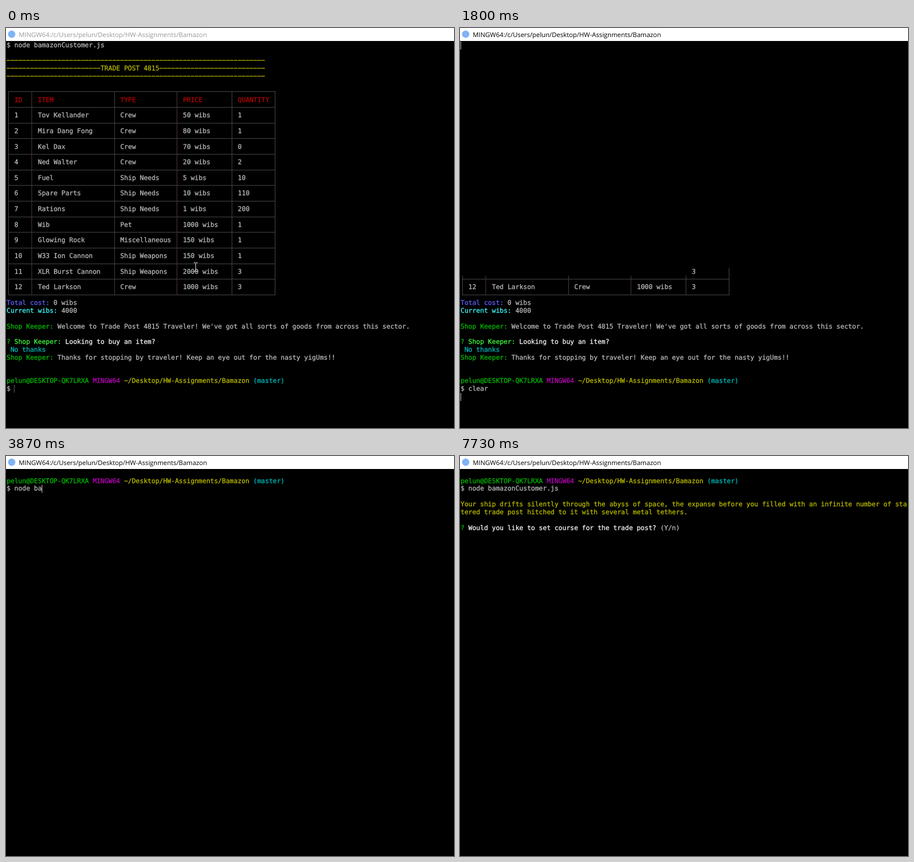
These frames come from a looping animation (790 by 708 pixels, 8000 ms). An HTML page:

```html
<!DOCTYPE html>
<html lang="en">
<head>
<meta charset="utf-8">
<title>Terminal</title>
<style>
  html, body { margin: 0; width: 100%; height: 100%; overflow: hidden; background: #000; }
  svg { display: block; }
  text {
    white-space: pre;
    text-rendering: geometricPrecision;
    font: 11.482px "DejaVu Sans Mono", monospace;
    stroke-width: 0.25px;
  }
  #title { font: 11.4px "Open Sans", "Noto Sans", sans-serif; }
</style>
</head>
<body>
<svg id="stage" width="790" height="708" viewBox="0 0 790 708"></svg>
<script>
const LOOP = 8000;
const CELL_W = 6.9125, CELL_H = 13.825, LEFT = 1, TOP = 23.5;
const C = {
  text: '#bfbfbf', white: '#fff', red: '#bf0000', green: '#00bf00', lime: '#40ff40',
  yellow: '#bfbf00', blue: '#6060ff', magenta: '#bf00bf', cyan: '#00bfbf', aqua: '#40ffff'
};
const colX = col => LEFT + col * CELL_W;
const rowY = row => TOP + row * CELL_H;

function add(parent, tag, attrs = {}, content = '') {
  const node = document.createElementNS('http://www.w3.org/2000/svg', tag);
  for (const key in attrs) node.setAttribute(key, attrs[key]);
  node.textContent = content;
  parent.append(node);
  return node;
}

const rect = (parent, x, y, width, height, fill) => add(parent, 'rect', { x, y, width, height, fill });

// parts alternate: text, colour name
function write(parent, row, col, ...parts) {
  const node = add(parent, 'text', { x: colX(col), y: Math.round(rowY(row) + 10.3) });
  for (let i = 0; i < parts.length; i += 2) {
    const color = C[parts[i + 1]];
    add(node, 'tspan', { fill: color, stroke: color }, parts[i]);
  }
  return node;
}

const stage = document.getElementById('stage');
rect(stage, 0, 0, 790, 708, '#000');
rect(stage, 0, 0, 790, 23, '#fff');
add(stage, 'circle', { cx: 10, cy: 11, r: 6.5, fill: '#80b3f5' });
const title = add(stage, 'text', { id: 'title', x: 22.5, y: 16 },
  'MINGW64:/c/Users/pelun/Desktop/HW-Assignments/Bamazon');

const shop = add(stage, 'g');
const shell = add(stage, 'g');
const story = add(stage, 'g');

function writePrompt(parent, row) {
  write(parent, row, 0, 'pelun@DESKTOP-QK7LRXA ', 'green', 'MINGW64 ', 'magenta',
    '~/Desktop/HW-Assignments/Bamazon ', 'yellow', '(master)', 'cyan');
  return write(parent, row + 1, 0, '$ ', 'text', '', 'text').lastChild;
}

const items = `ID|ITEM|TYPE|PRICE|QUANTITY
1|Tov Kellander|Crew|50 wibs|1
2|Mira Dang Fong|Crew|80 wibs|1
3|Kel Dax|Crew|70 wibs|0
4|Ned Walter|Crew|20 wibs|2
5|Fuel|Ship Needs|5 wibs|10
6|Spare Parts|Ship Needs|10 wibs|110
7|Rations|Ship Needs|1 wibs|200
8|Wib|Pet|1000 wibs|1
9|Glowing Rock|Miscellaneous|150 wibs|1
10|W33 Ion Cannon|Ship Weapons|150 wibs|1
11|XLR Burst Cannon|Ship Weapons|2000 wibs|3
12|Ted Larkson|Crew|1000 wibs|3`.split('\n').map(line => line.split('|'));

function drawTable(parent) {
  const edges = [0, 6, 27, 43, 57, 68];
  const tints = ['#404a44', '#4f3636', '#38444c', '#4f3636', '#404a40', '#404a44'];
  const midX = col => Math.round(colX(col + 0.5) - 0.5);
  const midY = row => Math.round(rowY(row + 0.5) - 1);
  for (let i = 0; i <= items.length; i++)
    rect(parent, midX(0), midY(6 + 2 * i), midX(68) - midX(0) + 1, 1, '#434645');
  edges.forEach((col, i) => rect(parent, midX(col), midY(6), 1, midY(32) - midY(6) + 1, tints[i]));
  items.forEach((cells, i) => cells.forEach((cell, k) =>
    write(parent, 7 + 2 * i, edges[k] + 2, cell, i ? 'text' : 'red')));
}

write(shop, 0, 0, '$ node bamazonCustomer.js', 'text');
// the minus sign gives the wide, nearly touching dashes of the banner
const dashes = n => '\u2212'.repeat(n);
write(shop, 2, 0, dashes(66), 'yellow');
write(shop, 3, 0, dashes(24) + 'TRADE POST 4815' + dashes(27), 'yellow');
write(shop, 4, 0, dashes(66), 'yellow');
drawTable(shop);
write(shop, 33, 0, 'Total cost: ', 'blue', '0 wibs', 'text');
write(shop, 34, 0, 'Current wibs: ', 'aqua', '4000', 'text');
write(shop, 36, 0, 'Shop Keeper: ', 'green',
  "Welcome to Trade Post 4815 Traveler! We've got all sorts of goods from across this sector.", 'text');
write(shop, 38, 0, '? ', 'green', 'Shop Keeper: ', 'lime', 'Looking to buy an item?', 'white');
write(shop, 39, 0, ' No thanks', 'cyan');
write(shop, 40, 0, 'Shop Keeper: ', 'green',
  'Thanks for stopping by traveler! Keep an eye out for the nasty yigUms!!', 'text');
const shopInput = writePrompt(shop, 43);
const shellInput = writePrompt(shell, 1);

write(story, 4, 0, 'Your ship drifts silently through the abyss of space, the expanse before you filled with an infinite number of sta', 'yellow');
write(story, 5, 0, 'tered trade post hitched to it with several metal tethers.', 'yellow');
write(story, 7, 0, '? ', 'green', 'Would you like to set course for the trade post? ', 'white', '(Y/n)', 'text');

// half-finished screen clear
const wipe = add(stage, 'g');
rect(wipe, 0, 23, 790, rowY(29) - 23, '#000');
rect(wipe, 0, rowY(29) - 1, 402, CELL_H + 1, '#000');
rect(wipe, 1, 24, 1, 14, C.text);

const caret = add(stage, 'line', { stroke: C.text, 'stroke-width': 1 });
const beam = add(stage, 'path', {
  d: 'M-3.5 -7.5h3M.5 -7.5h3M0 -7v14M-3.5 7.5h3M.5 7.5h3', stroke: '#e8e8e8', fill: 'none'
});

// time, typed text, caret row, caret column (null = blinked off)
const typing = [
  [0, '', 44, 2], [1070, '', 44, null],
  [1270, 'c', 44, 3], [1400, 'cl', 44, 4], [1530, 'clea', 44, 6], [1600, 'clear', 44, 7],
  [1730, 'clear', 45, 0], [1870, '', 0, 0], [2130, '', 2, 2],
  [2270, 'n', 2, 3], [2330, 'no', 2, 4], [2400, 'nod', 2, 5], [2530, 'node', 2, 6],
  [2600, 'node ', 2, 7], [3130, 'node ', 2, null], [3670, 'node ', 2, 7],
  [3800, 'node b', 2, 8], [3870, 'node ba', 2, 9], [4330, 'node bamazon', 2, 14],
  [4930, 'node bamazonC', 2, 15], [5000, 'node bamazonCustomer.js', 2, 26],
  [5400, 'node bamazonCustomer.js', 3, 0], [6330, 'node bamazonCustomer.js', 3, null],
  [6870, 'node bamazonCustomer.js', 3, 0], [7200, 'node bamazonCustomer.js', 7, 57],
  [7730, 'node bamazonCustomer.js', 7, null]
];

// time, x, y of the pointer
const pointer = [
  [0, 334.5, 423], [70, 368.5, 488], [270, 415.5, 549], [330, 446.5, 588], [400, 463.5, 605],
  [730, 484.5, 615], [800, 506.5, 624], [870, 520.5, 630]
];

const at = (steps, t) => steps.findLast(step => step[0] <= t);
const show = (node, on) => node.setAttribute('visibility', on ? 'visible' : 'hidden');

function render(t) {
  const focused = t >= 530;
  title.setAttribute('fill', focused ? '#000' : '#999');
  show(shop, t < 1870);
  show(shell, t >= 2130);
  show(story, t >= 7200);
  show(wipe, t >= 1800 && t < 1870);

  const [, typed, row, col] = at(typing, t);
  const input = t < 1870 ? shopInput : shellInput;
  if (input.textContent !== typed) input.textContent = typed;

  show(caret, col !== null);
  const x = Math.round(colX(col || 0) - 0.4) + 0.5, y = Math.round(rowY(row));
  const line = { x1: x, x2: x, y1: y, y2: y + 14, 'stroke-dasharray': focused ? 'none' : '1 1' };
  for (const key in line) caret.setAttribute(key, line[key]);

  const [, px, py] = at(pointer, t);
  show(beam, t < 1270);
  beam.setAttribute('transform', `translate(${px} ${py})`);
}

const start = performance.now();
function tick() {
  render((performance.now() - start) % LOOP);
  requestAnimationFrame(tick);
}
tick();
</script>
</body>
</html>
```
